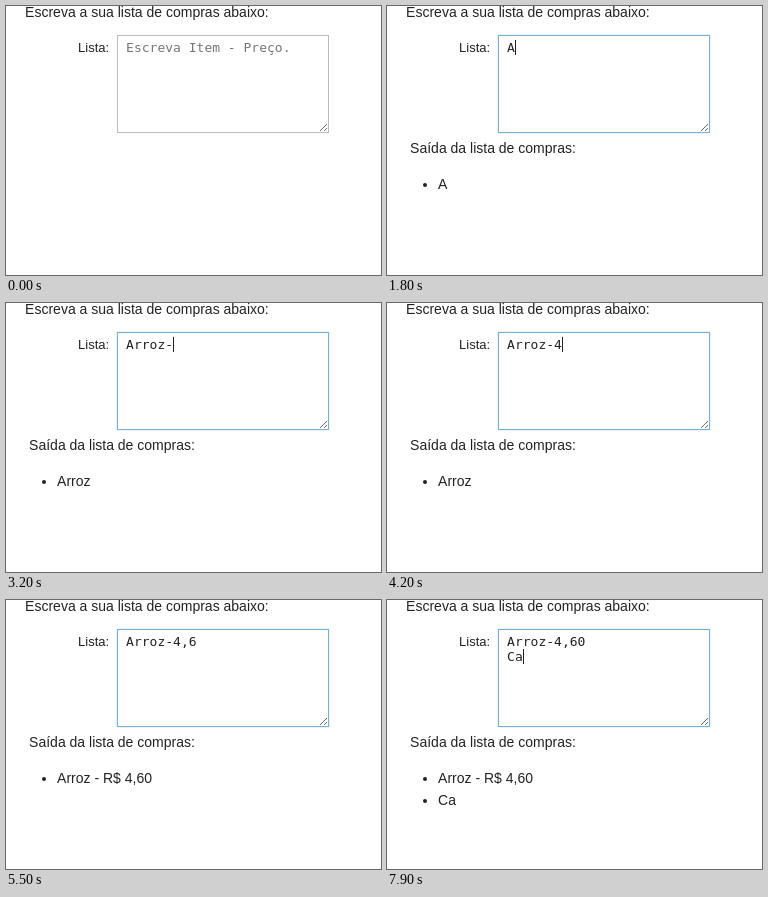
Recreate the animation shown at these times as an HTML page. Size 375 px wide and 269 px high, loop 8000 ms.

```html
<!DOCTYPE html>
<html lang="pt">
<head>
<meta charset="utf-8">
<title>Lista de compras</title>
<style>
  html, body { margin: 0; width: 100%; height: 100%; overflow: hidden; background: #fff; }
  #stage { position: relative; width: 375px; height: 269px; overflow: hidden;
    font: 14px/16px "Liberation Sans", Arial, sans-serif; color: #222; }
  #stage > *, .dot { position: absolute; white-space: pre; }
  #intro { left: 19.11px; top: -2px; }
  #label { left: 72.11px; top: 34px; font-size: 13px; line-height: 15px; }
  #box { left: 111px; top: 29px; width: 212px; height: 98px; box-sizing: border-box;
    border: 1px solid #bbb; }
  #box.focus { border-color: #74b0d4; box-shadow: 0 0 2px rgba(116, 176, 212, .4); }
  #grip { left: 314px; top: 118px; }
  #typed { left: 120.11px; top: 34px; font: 13px/15px "DejaVu Sans Mono", monospace; }
  #typed.empty { color: #757575; }
  #caret { width: 1px; height: 15px; background: #222; }
  #heading { left: 23.11px; top: 134px; }
  #items { left: 51.11px; top: 167px; line-height: 22px; }
  .item { position: relative; height: 22px; }
  .dot { left: -15px; top: 10px; width: 4px; height: 4px; border-radius: 50%; background: #222; }
</style>
</head>
<body>
<div id="stage">
  <div id="intro">Escreva a sua lista de compras abaixo:</div>
  <div id="label">Lista:</div>
  <div id="box"></div>
  <svg id="grip" width="7" height="7" stroke="#666" shape-rendering="crispEdges">
    <path d="M0 7L7 0M4 7L7 4"/>
  </svg>
  <div id="typed"></div>
  <div id="caret"></div>
  <div id="heading">Saída da lista de compras:</div>
  <div id="items"></div>
</div>
<script>
const LOOP = 8000, TICK = 100;
const FOCUS = 780;   // the field gains focus
const BLINK = 600;   // caret half-period, restarted by each key
const LAG = 60;      // the list follows the typing
const CHAR = 7.8267;
const HINT = "Escreva Item - Preço.";
const FULL = "Arroz-4,60\nCa";
const keys = [1720, 2080, 2220, 2480, 2780, 3180, 4180, 4480, 4820, 5980, 6680, 7480, 7780];

const $ = id => document.getElementById(id);
const box = $("box"), typed = $("typed"), caret = $("caret"),
      heading = $("heading"), items = $("items");

const textAt = t => FULL.slice(0, keys.filter(k => k <= t).length);
const setVisible = (el, on) => el.style.visibility = on ? "visible" : "hidden";

function format(line) {
  const [name, price] = line.split("-");
  if (!price) return name;
  const value = parseFloat(price.replace(",", "."));
  return `${name} - R$ ${value.toFixed(2).replace(".", ",")}`;
}

function makeItem(line) {
  const item = document.createElement("div");
  const dot = document.createElement("span");
  item.className = "item";
  dot.className = "dot";
  item.append(dot, format(line));
  return item;
}

function draw(t) {
  const focused = t >= FOCUS;
  const text = textAt(t);
  const lines = text.split("\n");
  const row = lines.length - 1;
  const last = Math.max(FOCUS, ...keys.filter(k => k <= t));

  box.className = focused ? "focus" : "";
  typed.className = text ? "" : "empty";
  typed.textContent = text || HINT;

  setVisible(caret, focused && (t - last) % (2 * BLINK) < BLINK);
  caret.style.left = Math.round(120 + CHAR * lines[row].length) + "px";
  caret.style.top = 34 + 15 * row + "px";

  const listed = textAt(t - LAG);
  setVisible(heading, listed);
  items.replaceChildren(...listed.split("\n").filter(Boolean).map(makeItem));
}

let shown = -1;
function frame() {
  const t = Math.floor(performance.now() % LOOP / TICK) * TICK;
  if (t !== shown) draw(shown = t);
  requestAnimationFrame(frame);
}
frame();
</script>
</body>
</html>
```
